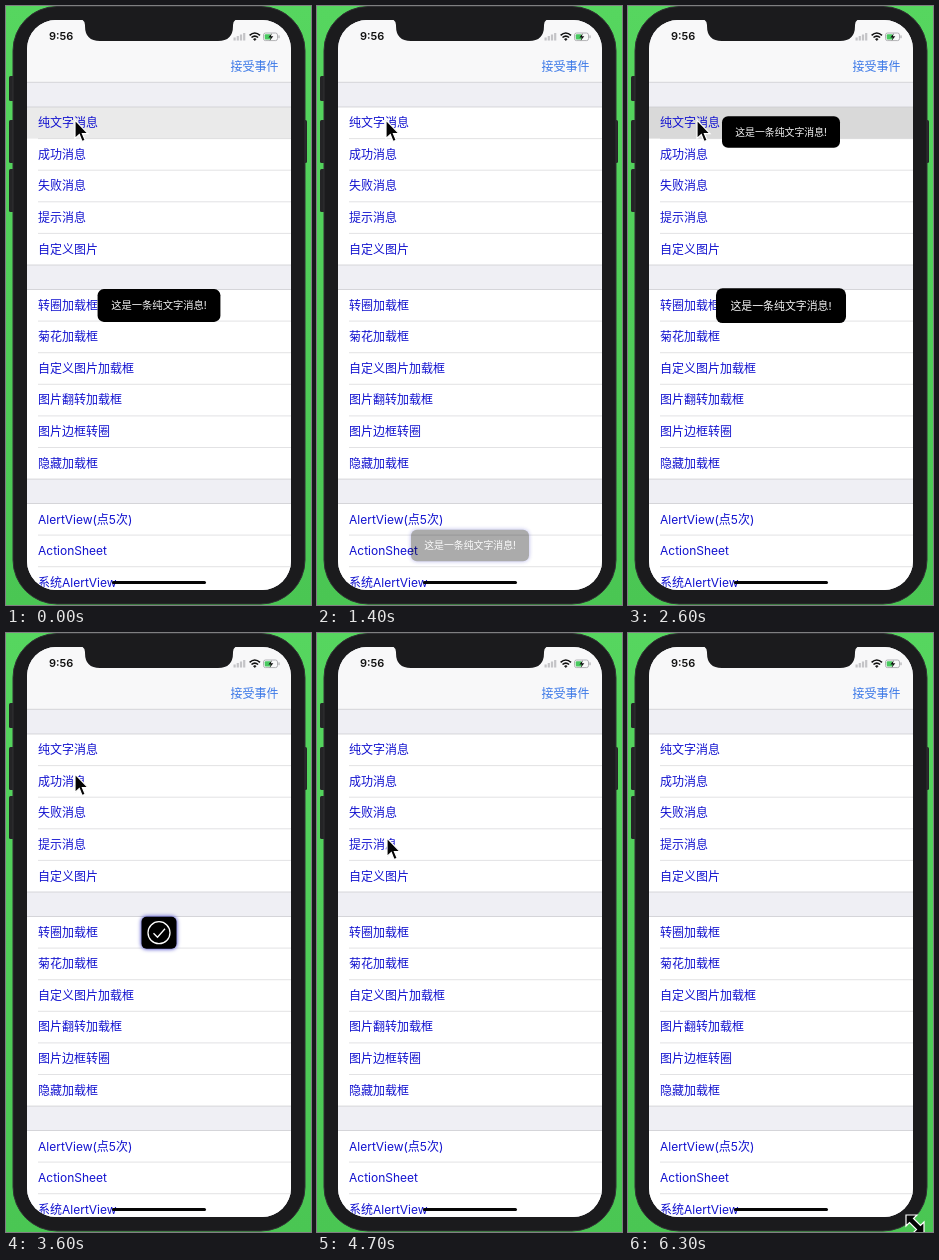
Animation, 305 px wide and 599 px high, one loop 6.4 s. Source, as an HTML page:

```html
<!DOCTYPE html>
<html lang="zh-CN">
<head>
<meta charset="utf-8">
<style>
  html, body { margin: 0; width: 100%; height: 100%; overflow: hidden; background: #50cd59; }
  svg { display: block; font-family: Inter, "Noto Sans CJK SC", "Noto Sans CJK", sans-serif; }
  .row { font-size: 12px; fill: #1212cf; }
  .line { stroke: #d6d6d9; stroke-width: .7; }
  .edge { stroke: #c8c8cc; stroke-width: .7; }
  .toast text { font-size: 9.9px; fill: #f4f4f4; }
  .glow { filter: drop-shadow(0 0 2px #2020c0); }
</style>
</head>
<body>
<svg width="305" height="599" viewBox="0 0 305 599">
  <defs>
    <clipPath id="screen"><rect x="21" y="14" width="264" height="570" rx="29"/></clipPath>
    <linearGradient id="green" x2="0" y2="1">
      <stop stop-color="#56d65f"/><stop offset="1" stop-color="#4ac653"/>
    </linearGradient>
  </defs>
  <rect width="305" height="599" fill="url(#green)"/>
  <g fill="#242426">
    <rect x="3" y="70" width="6" height="25" rx="1.5"/>
    <rect x="3" y="114" width="6" height="43" rx="1.5"/>
    <rect x="3" y="163" width="6" height="43" rx="1.5"/>
    <rect x="296" y="114" width="5" height="43" rx="1.5"/>
  </g>
  <rect x="7" y=".5" width="292" height="597.5" rx="44" fill="#1b1b1d" stroke="#303033"/>
  <g clip-path="url(#screen)">
    <rect x="21" y="14" width="264" height="570" fill="#efeff4"/>
    <rect x="21" y="14" width="264" height="62.3" fill="#f8f8f9"/>
    <path class="edge" d="M21 76.3H285"/>
    <text x="224.5" y="65.3" font-size="12" fill="#3b78e7">接受事件</text>
    <g id="list"></g>
    <text x="43" y="34" font-size="11" font-weight="600" fill="#111">9:56</text>
    <g fill="#c4c4c7">
      <rect x="227.5" y="31.5" width="2.2" height="3"/><rect x="230.7" y="30" width="2.2" height="4.5"/>
      <rect x="233.9" y="28.5" width="2.2" height="6"/><rect x="237.1" y="27" width="2.2" height="7.5"/>
    </g>
    <g fill="none" stroke="#111" stroke-width="1.6">
      <path d="M243.6 29.3q5.2-4.6 10.4 0M245.5 31.5q3.3-2.8 6.6 0"/>
      <path d="M248.8 34.6l-1.3-1.5q1.3-1 2.6 0z" stroke-width=".7" fill="#111"/>
    </g>
    <rect x="257.5" y="27" width="14" height="7.6" rx="2" fill="none" stroke="#a0a0a4" stroke-width=".8"/>
    <path d="M273 29.4v2.8" stroke="#a0a0a4"/>
    <rect x="258.7" y="28.2" width="6" height="5.2" rx="1" fill="#49c960"/>
    <path d="M265.8 27.2l-3.4 4.3h2.3l-1 3.2 3.6-4.5h-2.4z" fill="#111"/>
    <rect x="106" y="575" width="94" height="3" rx="1.5" fill="#050505"/>
    <path d="M74 13Q79 14 79 19V20Q79 35 94 35H212Q227 35 227 20V19Q227 14 232 13Z" fill="#1b1b1d"/>
    <g id="banner" class="toast glow">
      <rect x="19" y="8" width="268" height="71.5"/>
      <text x="56.5" y="65.5" style="font-size:10.5px">这是一条纯文字消息!</text>
    </g>
    <g id="toasts"></g>
  </g>
  <g id="arrow">
    <path d="M0 0V18.5L4.3 14.6L7 21.5L10.2 20.2L7.4 13.6H13Z" fill="#050505" stroke="#fff" stroke-width="1.2"/>
  </g>
  <g id="resize">
    <path d="M-9-9H2L-1.5-5.5L5.5 1.5L9-2V9H-2L1.5 5.5L-5.5-1.5L-9 2Z" fill="#050505" stroke="#fff" stroke-width="1.2"/>
  </g>
</svg>
<script>
const LOOP = 6400, ROW = 31.6;
const $ = id => document.getElementById(id);
const clamp = v => Math.max(0, Math.min(1, v));
const ease = v => { v = clamp(v); return v * v * (3 - 2 * v); };
const show = (el, alpha) => el.setAttribute('opacity', alpha);

const sections = [
  [101, ['纯文字消息', '成功消息', '失败消息', '提示消息', '自定义图片']],
  [283.5, ['转圈加载框', '菊花加载框', '自定义图片加载框', '图片翻转加载框', '图片边框转圈', '隐藏加载框']],
  [497.5, ['AlertView(点5次)', 'ActionSheet', '系统AlertView']]
];
$('list').innerHTML = sections.map(([top, names]) => {
  const bottom = top + names.length * ROW;
  return `<rect x="21" y="${top}" width="264" height="${bottom - top}" fill="#fff"/>` +
    names.map((name, i) => {
      const y = top + i * ROW;
      return `<rect class="tap" x="21" y="${y}" width="264" height="${ROW}" fill="#d9d9d9" opacity="0"/>` +
        (i ? `<path class="line" d="M32 ${y}H285"/>` : '') +
        `<text class="row" x="32" y="${y + 20.1}">${name}</text>`;
    }).join('') +
    `<path class="edge" d="M21 ${top}H285M21 ${bottom}H285"/>`;
}).join('');
const rows = document.querySelectorAll('.tap');

const label = '<rect x="-59" y="-15.8" width="118" height="31.6" rx="6"/>' +
  '<text text-anchor="middle" y="3.6">这是一条纯文字消息!</text>';
const check = '<rect x="-17.5" y="-16" width="35" height="32" rx="5"/>' +
  '<g fill="none" stroke="#fff" stroke-width="1.3"><circle r="11"/><path d="M-5.5 .5L-1.5 4.5L6-4"/></g>';

// Each toast pops in oversized, settles, then fades.
const toasts = [
  { y: 299.5, start: -140, end: 600, body: label },
  { y: 539.5, start: 780, end: 1450, body: label, glow: true },
  { y: 126, start: 2280, end: 2900, body: label },
  { y: 299.7, start: 2520, end: 3200, body: label },
  { y: 299.7, start: 3380, end: 4000, body: check, glow: true }
];
$('toasts').innerHTML = toasts.map(t => `<g class="toast${t.glow ? ' glow' : ''}">${t.body}</g>`).join('');
toasts.forEach((t, i) => t.el = $('toasts').children[i]);

const taps = [[0, -140], [0, 600], [0, 1450], [0, 2130], [0, 2450], [1, 3250]];

// time, x, y of the pointer tip
const path = [
  [0, 69, 114], [3050, 69, 114], [3250, 69, 141], [4000, 69, 141], [4200, 69, 173],
  [4450, 69, 173], [4650, 70, 205], [5250, 70, 205], [5450, 70, 237],
  [5850, 70, 237], [6250, 287, 591], [LOOP, 287, 591]
];
function pointer(t) {
  const i = path.findIndex(p => p[0] > t), [t0, x0, y0] = path[i - 1], [t1, x1, y1] = path[i];
  const k = ease((t - t0) / (t1 - t0));
  return [x0 + (x1 - x0) * k, y0 + (y1 - y0) * k];
}

function draw(now) {
  const t = now % LOOP;
  for (const { el, y, start, end } of toasts) {
    const left = 1 - clamp((t - start) / 200);
    el.setAttribute('transform', `translate(153 ${y}) scale(${1 + .2 * left ** 1.3})`);
    show(el, t < start ? 0 : Math.min(clamp((t - start) / 50), clamp((end - t) / 150)));
  }

  const drop = ease((t - 1500) / 200) - ease((t - 2120) / 180);
  $('banner').setAttribute('transform', `translate(0 ${-75 * (1 - drop)})`);
  show($('banner'), drop > 0 ? 1 : 0);

  rows.forEach((row, i) => show(row, Math.max(0, ...taps.map(([r, start]) =>
    r === i && t >= start ? clamp((280 - (t - start)) / 130) * clamp((t - start) / 40) : 0))));
  if (t < 140) show(rows[0], .55 * (1 - t / 140));

  const [x, y] = pointer(t), atCorner = x > 270;
  $('arrow').setAttribute('transform', `translate(${x} ${y})`);
  $('resize').setAttribute('transform', `translate(${x} ${y})`);
  show($('arrow'), atCorner ? 0 : 1);
  show($('resize'), atCorner ? 1 : 0);
}

const origin = performance.now();
function tick() {
  draw(performance.now() - origin);
  requestAnimationFrame(tick);
}
tick();
</script>
</body>
</html>
```
